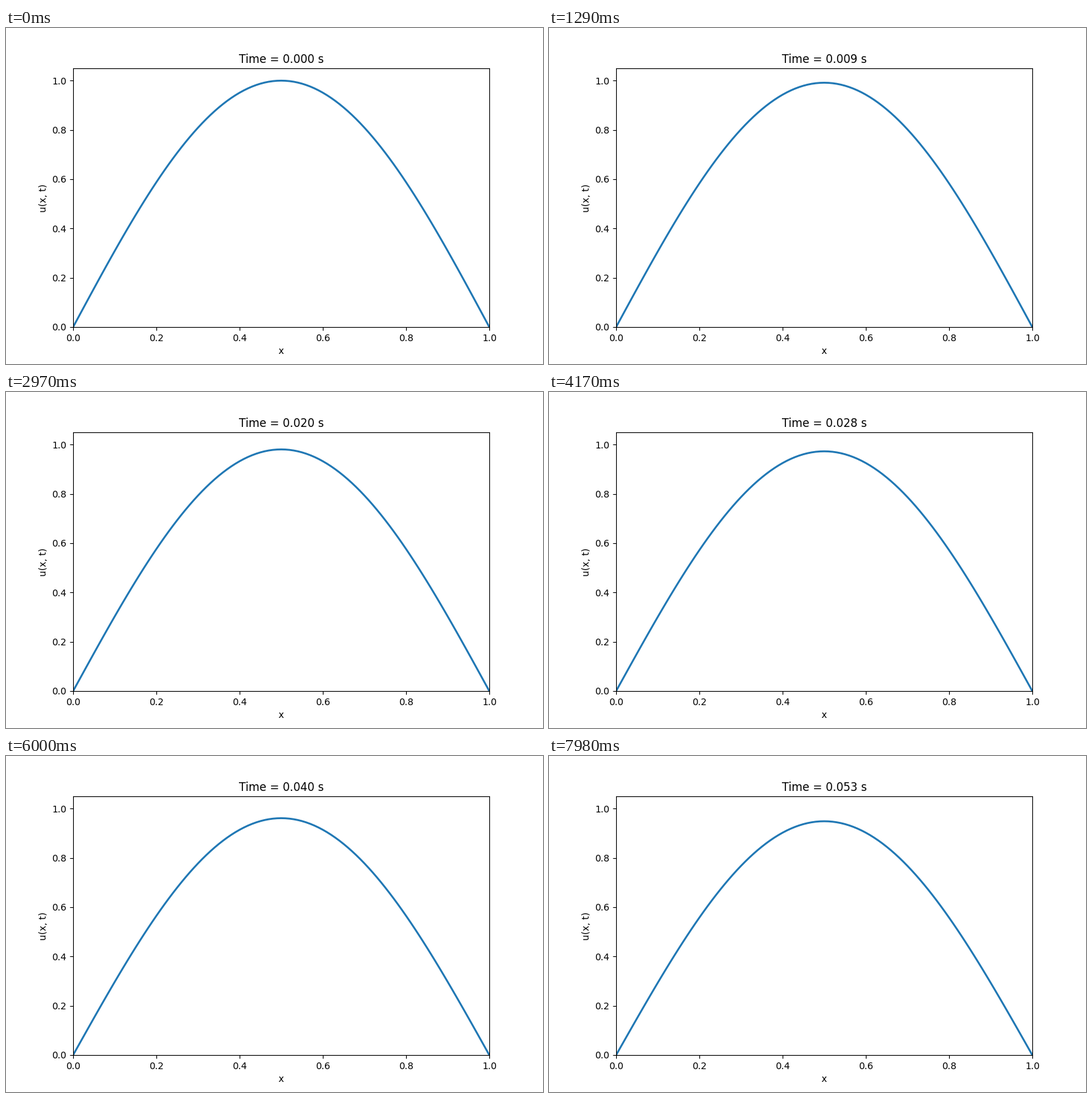
These frames come from a looping animation (800 by 500 pixels, 8 s). A matplotlib script:

```python
import matplotlib.pyplot as plt
import numpy as np
from matplotlib.animation import FuncAnimation

ALPHA = 0.1       # diffusivity
DT = 0.0002       # simulated seconds per step
STEP_MS = 30      # display time of one step
TICK_MS = 20
LOOP_MS = 8000

x = np.linspace(0, 1, 101)


def heat(t):
    """First sine mode of the 1D heat equation with fixed zero ends."""
    return np.exp(-ALPHA * np.pi**2 * t) * np.sin(np.pi * x)


fig, ax = plt.subplots(figsize=(8, 5), dpi=100)
line, = ax.plot(x, heat(0), lw=2, color="#1f77b4")
ax.set_xlim(0, 1)
ax.set_ylim(0, 1.05)
ax.set_xlabel("x")
ax.set_ylabel("u(x, t)")
title = ax.set_title("Time = 0.000 s")


def update(i):
    step = (i * TICK_MS + TICK_MS // 2) // STEP_MS
    t = step * DT
    line.set_ydata(heat(t))
    title.set_text(f"Time = {t:.3f} s")
    return line, title


anim = FuncAnimation(fig, update, frames=LOOP_MS // TICK_MS,
                     interval=TICK_MS, repeat=True, repeat_delay=0)
plt.show()
```
